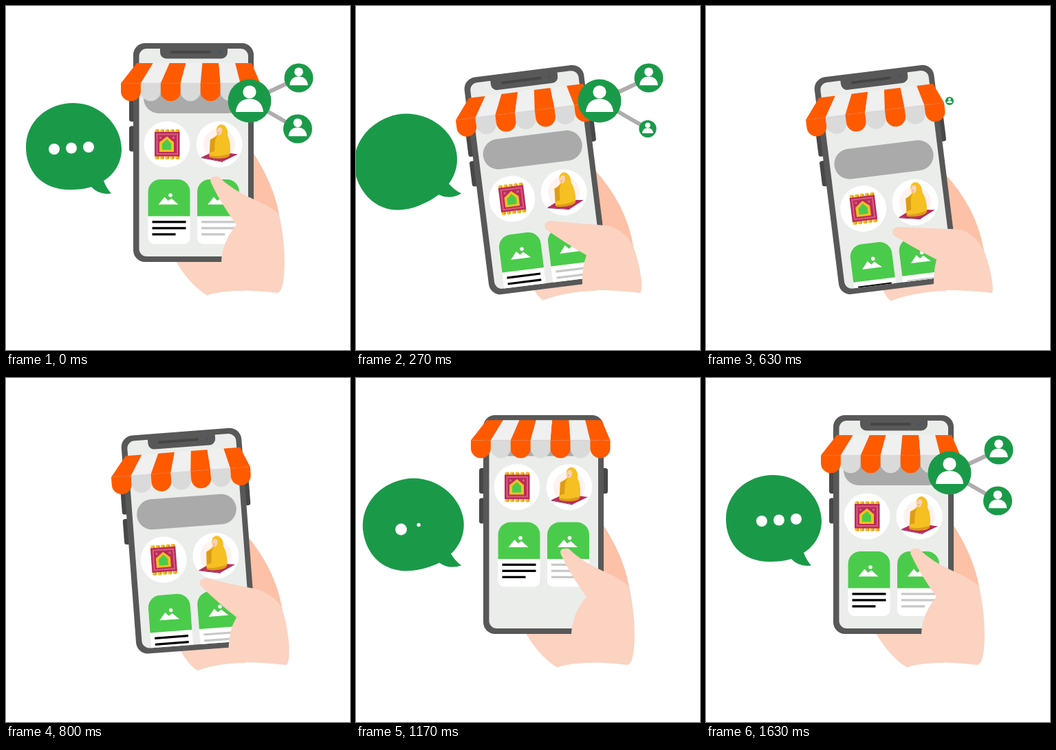
An HTML page with a canvas that plays this animation: 500x500 px, repeating every 2010 ms.

```html
<!DOCTYPE html>
<html lang="en">
<head>
<meta charset="utf-8">
<title>Mobile shop</title>
<style>
  html, body { margin: 0; width: 100%; height: 100%; overflow: hidden; background: #fff; }
  canvas { display: block; width: 100vw; height: 100vh; }
</style>
</head>
<body>
<canvas id="stage" width="500" height="500"></canvas>
<script>
const ctx = document.getElementById('stage').getContext('2d');
const LOOP = 2010, FPS = 0.03, END = 1634;
const GREEN = '#1a9a49', LEAF = '#4bcb4b', ORANGE = '#ff5a00', FRAME = '#585858',
  SCREEN = '#ebedeb', SKIN = '#fcd2c1', SKIN_DARK = '#fdc1a7', GOLD = '#f6bf22',
  OCHRE = '#dd9c17', CRIMSON = '#b92d5d', ROSE = '#dc5c7c';

const clamp = v => Math.max(0, Math.min(1, v));
const ramp = (t, a, b) => Math.sin(clamp((t - a) / (b - a)) * Math.PI / 2);

// Smooth track through [time, value] keys, flat at its turning points
function track(keys) {
  const slope = i => {
    if (!i || i === keys.length - 1) return 0;
    const [a, b, c] = keys.slice(i - 1, i + 2);
    return (b[1] - a[1]) * (c[1] - b[1]) <= 0 ? 0 : (c[1] - a[1]) / (c[0] - a[0]);
  };
  return t => {
    if (t <= keys[0][0]) return keys[0][1];
    const i = keys.findIndex(k => k[0] > t) - 1;
    if (i < 0) return keys[keys.length - 1][1];
    const [t0, v0] = keys[i], [t1, v1] = keys[i + 1];
    const d = t1 - t0, u = (t - t0) / d, w = 1 - u;
    return v0 * w * w * (1 + 2 * u) + v1 * u * u * (3 - 2 * u)
      + d * u * w * (slope(i) * w - slope(i + 1) * u);
  };
}

const tilt = track([[0, 0], [170, 5.1], [430, 10], [470, 10.2], [530, 9.1], [630, 7.15],
  [970, 1.6], [1070, 0.45], [1140, 0]]);
const grip = track([[0, 0], [170, 0.51], [430, 1], [480, 1], [630, 0.86], [970, 0.15], [1130, 0]]);
const scroll = track([[0, 0], [170, 25], [430, 49], [540, 52], [630, 50], [970, 16], [1180, -43], [1590, 0]]);
const lift = track([[630, 0], [970, -3.5], [1180, -22], [1590, 0]]);
const bubbleSize = track([[195, 0], [240, 0.37], [300, 0.995], [400, 1.08], [500, 1.055], [670, 1]]);
const bubbleTurn = track([[195, -46], [240, -41], [300, -34], [500, -10.6], [670, 0]]);

function fill(color, draw) {
  ctx.fillStyle = color;
  ctx.beginPath();
  draw();
  ctx.fill();
}
const box = (x, y, w, h, r, color) => fill(color, () => ctx.roundRect(x, y, w, h, r));
const disc = (x, y, r, color) => fill(color, () => ctx.arc(x, y, r, 0, 7));
const poly = (color, ...p) => fill(color, () => {
  for (let i = 0; i < p.length; i += 2) ctx.lineTo(p[i], p[i + 1]);
});
const shape = (color, d) => { ctx.fillStyle = color; ctx.fill(new Path2D(d)); };
function line(x0, y0, x1, y1, width, color) {
  ctx.strokeStyle = color;
  ctx.lineWidth = width;
  ctx.beginPath();
  ctx.moveTo(x0, y0);
  ctx.lineTo(x1, y1);
  ctx.stroke();
}
function group(draw) {
  ctx.save();
  draw();
  ctx.restore();
}
function turn(x, y, degrees, size = 1) {
  ctx.translate(x, y);
  ctx.rotate(degrees * Math.PI / 180);
  ctx.scale(size, size);
  ctx.translate(-x, -y);
}

// Each number in braces is "upright|tilted"
const blend = (d, k) => d.replace(/(-?[\d.]+)\|(-?[\d.]+)/g, (_, a, b) => +a + (b - a) * k);

const FINGERS = 'M355|342 207|246 Q388|394 255|298 397|405 303|364 L345 290|345Z';
const PALM = 'M243|254 364|405 Q264|258 403|425 292|265 420.5|430 ' +
  'Q315|300 413|416 345|350 414 L345 350|390Z';
const THUMB = 'M335 318|377 Q311|300 285|363 298|268 257|346 Q294|263 246|335 309|277 248|333.5 ' +
  'Q328|325 267|333 360|368 281|332 Q386|388 292|334 397|405 303|364 ' +
  'Q405|415 340|388 405|418 375|406 Q404|420 417 394|419 417 ' +
  'Q345|375 411|412 317|334 415|413 L313|334 372|409 Q314|334 343|390 335 318|377Z';

function rug() {
  for (let i = 0; i < 5; i++) {
    const x = 216.5 + i * 7.4;
    box(x, 179, 6, 7, 2.5, GOLD);
    box(x, 216, 6, 7, 2.5, GOLD);
    box(x + 3.5, 180, 2.5, 5, 1, OCHRE);
    box(x + 3.5, 217, 2.5, 5, 1, OCHRE);
  }
  box(216, 183, 36.5, 35.5, 0, CRIMSON);
  box(218.5, 185.5, 31.5, 30.5, 0, ROSE);
  box(220.5, 187.5, 27.5, 26.5, 0, CRIMSON);
  disc(224.5, 191.5, 1.8, ROSE);
  disc(243.5, 191.5, 1.8, ROSE);
  poly(GOLD, 223, 212, 223, 198, 234, 189.5, 244, 198, 244, 212);
  poly(LEAF, 227, 209, 227, 200, 234, 193.5, 240, 200, 240, 209);
}

function worshipper() {
  disc(310, 201, 23, '#fdf2ef');
  poly(CRIMSON, 283.5, 220, 303, 211, 337, 215.5, 315, 226);
  poly('#8f2350', 283.5, 220, 315, 226, 315, 227, 284, 221);
  shape(GOLD, 'M313 172C320 173 323 180 322 188C326 195 327 209 325 217' +
    'Q312 223 298 220Q294 218 296 211L297 194Q304 190 307 187Q303 174 313 172Z');
  shape(OCHRE, 'M295 217Q308 220 325 215Q326 219 318 221Q306 223 296 220Z');
  shape(OCHRE, 'M297 194Q304 192 307 188L304 196L303 211L296 213Z');
  shape('#f9d3bd', 'M307 179Q310 174 314 178Q315 185 310 188Q305 185 307 179Z');
  disc(309, 184, 1, '#e8937f');
}

function card(x, ink) {
  box(x, 252, 61, 94, [18, 18, 9, 9], '#fff');
  box(x, 252, 61, 53.5, [18, 18, 0, 0], LEAF);
  poly('#fff', x + 15, 288.5, x + 24, 277.5, x + 29, 283, x + 34, 279.5, x + 44, 288.5);
  disc(x + 32.5, 275, 2.8, '#fff');
  [49, 49, 34].forEach((w, i) => box(x + 6, 312.3 + i * 9, w, 3.2, 0, ink));
}

function awning() {
  const low = 202.5 / 7, high = 167 / 7;
  for (let i = 0; i < 7; i++) {
    const x = 167 + i * low, top = 190 + i * high, odd = i % 2;
    box(x, 112, low, 26.3, [0, 0, 14.4, 14.4], odd ? '#dadada' : ORANGE);
    poly(odd ? '#f0f0f0' : ORANGE, top, 83, top + high, 83, x + low, 112.3, x, 112.3);
  }
  line(167, 112.3, 369.5, 112.3, 0.5, 'rgba(200,180,170,.6)');
}

function phone(t) {
  for (const [x, y] of [[179, 131], [179, 174.5], [352, 131]]) box(x, y, 14, 37, 3.5, '#474747');
  box(185, 54, 175, 318, 17, FRAME);
  box(193.5, 62, 158.5, 302, 11, SCREEN);
  group(() => {
    ctx.beginPath();
    ctx.roundRect(193.5, 62, 158.5, 302, 11);
    ctx.clip();
    ctx.translate(0, scroll(t));
    box(200, 112, 145, 44, 22, '#aaa');
    disc(234, 201, 33.5, '#fff');
    disc(310, 201, 33.5, '#fff');
    rug();
    worshipper();
    card(206.5, '#000');
    card(278, '#c8c8c8');
  });
  box(224, 56, 98, 20.5, [0, 0, 9, 9], FRAME);
  box(239, 65, 59, 4, 2, '#454545');
  disc(310, 67, 2.4, '#445866');
  ctx.translate(0, lift(t));
  awning();
}

function bubble(t) {
  const m = Math.abs(t - 670), size = bubbleSize(m);
  if (size <= 0) return;
  turn(153, 272, bubbleTurn(m), size);
  shape(GREEN, 'M98 141C138 141 168 175 168 208C168 228 157 245 142 254Q146 265 153 272.5' +
    'Q135 275 124 263C113 266 104 267 93 267C50 267 29 238 29 205C29 168 60 141 98 141Z');
  const leaving = t < 400;
  for (let i = 0; i < 3; i++) {
    const start = 965 + i * 170;
    const grow = leaving ? 1 - clamp(t / 140) : ramp(t, start, start + 150);
    disc((leaving ? 70 : 81) + i * 25, 208 - i * 1.5, 8 * grow, '#fff');
  }
}

function person(x, y, r, size) {
  if (size <= 0) return;
  ctx.save();
  ctx.translate(x, y);
  ctx.scale(size * r / 31.5, size * r / 31.5);
  disc(0, 0, 31.5, GREEN);
  disc(0, -13, 9.6, '#fff');
  shape('#fff', 'M-20 16C-19 4 -12 -3 0 -3S19 4 20 16Z');
  ctx.restore();
}

function network(t) {
  const n = Math.abs(t - 910), ax = 354, ay = 138;
  const links = [[425.5, 104.5, 360, 420, 515], [424, 178.5, 510, 590, 720]];
  for (const [x, y, from, to] of links) {
    const k = clamp((n - from) / (to - from));
    if (k) line(ax, ay, ax + (x - ax) * k, ay + (y - ay) * k, 6, '#b0acae');
  }
  for (const [x, y, , from, to] of links) person(x, y, 21, ramp(n, from, to));
  person(ax, ay, 31.5, ramp(n, 265, 360));
}

function paint(now) {
  const t = Math.min(END, Math.floor((now % LOOP) * FPS + 0.15) / FPS);
  const k = grip(t);
  ctx.fillStyle = '#fff';
  ctx.fillRect(0, 0, 500, 500);
  group(() => bubble(t));
  shape(SKIN_DARK, blend(FINGERS, k));
  shape(SKIN, blend(PALM, k));
  group(() => {
    turn(585, 316, -tilt(t));
    phone(t);
  });
  shape(SKIN, blend(THUMB, k));
  network(t);
  requestAnimationFrame(paint);
}
requestAnimationFrame(paint);
</script>
</body>
</html>
```
